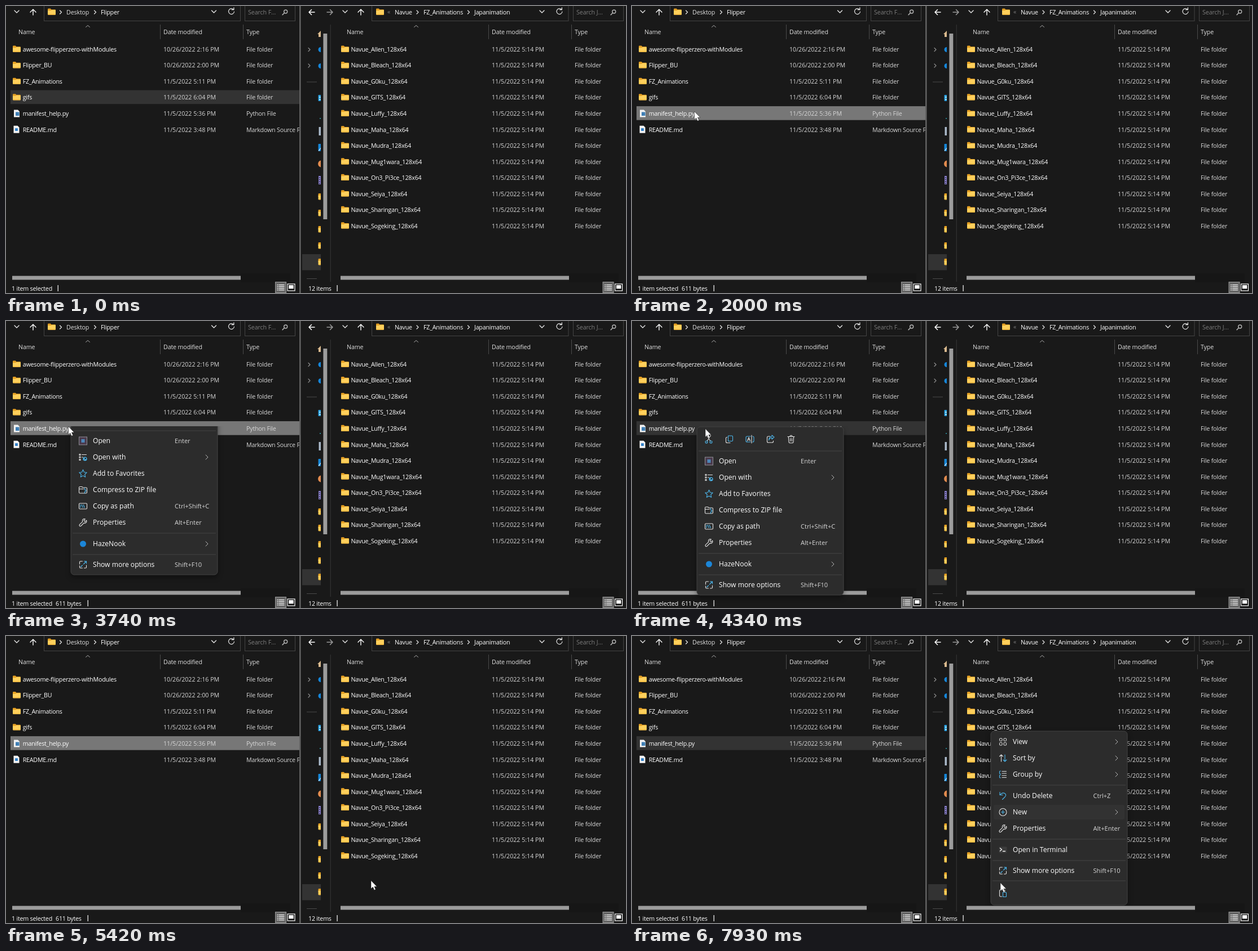
These frames come from a looping animation (1099x510 px, 8000 ms). An HTML page:

```html
<!DOCTYPE html>
<html lang="en">
<head>
<meta charset="utf-8">
<title>File explorer</title>
<style>
html, body { margin: 0; width: 100%; height: 100%; overflow: hidden; background: #191919; }
svg { display: block; width: 1099px; height: 510px; }
text { font: 10.7px "Open Sans", "Noto Sans", sans-serif; fill: #fff; white-space: pre; }
.name { letter-spacing: -.22px; }
.cell { fill: #d6d6d6; letter-spacing: -.02px; }
.kind { fill: #d6d6d6; letter-spacing: -.2px; }
.head { fill: #dedede; letter-spacing: -.15px; }
.dim { fill: #7d7d7d; letter-spacing: -.1px; }
.item { font-size: 12.1px; }
.keys { font-size: 11.1px; fill: #d6d6d6; }
.line { fill: none; stroke-linecap: round; stroke-linejoin: round; }
.pop { filter: drop-shadow(0 4px 5px rgba(0, 0, 0, .4)); }
</style>
</head>
<body>
<svg id="stage" viewBox="0 0 1099 510"></svg>
<script>
const LOOP = 8000, ROW0 = 77, ROW = 28.52;
const USER = 'Navue';
const WHITE = '#e6e6e6', BLUE = '#4cb8ee';
const stage = document.getElementById('stage');

const rect = (x, y, w, h, fill, extra = '') =>
  `<rect x="${x}" y="${y}" width="${w}" height="${h}" fill="${fill}" ${extra}/>`;
const path = (d, color = WHITE, width = 1.1) =>
  `<path class="line" d="${d}" stroke="${color}" stroke-width="${width}"/>`;
const dot = (x, y, r, fill) => `<circle cx="${x}" cy="${y}" r="${r}" fill="${fill}"/>`;
const text = (x, y, s, cls) => `<text class="${cls}" x="${x}" y="${y + 3.9}">${s}</text>`;
const at = (x, y, body) => `<g transform="translate(${x} ${y})">${body}</g>`;
const rowY = i => ROW0 + i * ROW;

const folder = (x, y) => at(x, y,
  '<path d="M0 1.2Q0 0 1.2 0H4.8L6.4 1.7H12.8Q14 1.7 14 2.9V6H0Z" fill="#e5a023"/>' +
  '<path d="M0 3.6H5.4L7 2.5H13Q14 2.5 14 3.6V10.2Q14 11.3 12.9 11.3H1.1Q0 11.3 0 10.2Z" fill="#ffd05c"/>' +
  rect(.4, 9.8, 13.2, 1.4, '#f3b83c', 'rx=".6"'));
const page = (x, y, mark) => at(x, y,
  '<path d="M0 0H7L10 3V13H0Z" fill="#f2f2f2"/>' + mark);

const right = (x, y, c = WHITE) => path(`M${x - 1.5} ${y - 3}l3 3l-3 3`, c, 1.3);
const down = (x, y, r = 4) => path(`M${x - r} ${y - r / 2}l${r} ${r}l${r} ${-r}`, WHITE, 1.4);
const upArrow = (x, y) => path(`M${x} ${y + 5}v-10m-5 5l5 -5l5 5`, '#fff', 1.4);
const sideArrow = (x, y, dir, c) =>
  path(`M${x - 5 * dir} ${y}h${10 * dir}m${-4.5 * dir} -4.5l${4.5 * dir} 4.5l${-4.5 * dir} 4.5`, c, 1.5);
const refresh = (x, y) => path(`M${x + 4} ${y - 3}a5 5 0 1 0 1 3.5m-.6 -7.2v3.8h-3.8`, WHITE, 1.2);
const lens = (x, y) =>
  `<circle cx="${x + 1.2}" cy="${y - 1}" r="3" fill="none" stroke="#b5b5b5" stroke-width="1.4"/>` +
  path(`M${x - 1} ${y + 1.2}l-3.4 3.4`, '#b5b5b5', 1.5);
const box = (x, w) => rect(x, -4, w, 30.5, 'none', 'stroke="#444"');

// Address bar, column headings, scroll bar and view buttons shared by both panes
function frame(bar, barW, find, hint, cols, caret, scroll, views) {
  const [name, date, type] = cols;
  const sep = x => rect(x, 33, 1, 26, '#4a4a4a');
  return box(bar, barW) + box(find, 89) + text(find + 5.5, 11, hint, 'dim') + lens(find + 71, 11) +
    down(bar + barW - 47, 10) + refresh(bar + barW - 16, 9.5) +
    text(name, 46.5, 'Name', 'head') + text(date, 46.5, 'Date modified', 'head') + text(type, 46.5, 'Type', 'head') +
    sep(date - 6) + sep(type - 6) + path(`M${caret - 3.5} 37.5l3.5 -3l3.5 3`, '#aaa', 1) +
    rect(scroll + 405, 475, 88, 16, '#161616') + rect(scroll, 479.6, 405, 6.9, '#9c9c9c') +
    rect(views, 490.5, 19, 19, '#666', 'stroke="#999"') +
    [495.5, 498.5, 501.5, 504.5].map(y => rect(views + 3, y - .5, 2, 1.2, '#fff') +
      rect(views + 6, y - .5, 10, 1.2, '#fff')).join('') +
    rect(views + 21.5, 494, 13, 12, '#111', 'stroke="#fff" stroke-width="1.2"') +
    rect(views + 23.8, 496, 8.4, 6.4, '#fff');
}

const files = [
  ['awesome-flipperzero-withModules', '10/26/2022 2:16 PM', 'File folder'],
  ['Flipper_BU', '10/26/2022 2:00 PM', 'File folder'],
  ['FZ_Animations', '11/5/2022 5:11 PM', 'File folder'],
  ['gifs', '11/5/2022 6:04 PM', 'File folder'],
  ['manifest_help.py', '11/5/2022 5:36 PM', 'Python File'],
  ['README.md', '11/5/2022 3:48 PM', 'Markdown Source File']
];
const packs = 'Allen Bleach G0ku GITS Luffy Maha Mudra Mug1wara On3_Pi3ce Seiya Sharingan Sogeking'.split(' ');

function listRow(i, x, xs, cells, icon) {
  const y = rowY(i);
  return (icon || folder(x, y - 6.4)) + text(xs[0], y, cells[0], 'name') +
    text(xs[1], y, cells[1], 'cell') + text(xs[2], y, cells[2], 'kind');
}

function leftPane() {
  const icons = {
    4: page(14, 184.5, rect(3, 4, 6.5, 6.5, '#3f7fb5')),
    5: page(13.5, 212.7, rect(2.6, 4.5, 4.8, 4.8, '#2f7fc8'))
  };
  return down(19, 10) + upArrow(48, 11) + folder(74, 4.5) + right(97, 11) +
    text(107, 11, 'Desktop', 'head') + right(158, 11) + text(168, 11, 'Flipper', 'name') +
    frame(67.5, 348, 423.5, 'Search F…', [22, 279, 426], 145, 11, 477.5) +
    files.map((f, i) => listRow(i, 12, [29.7, 279, 426], f, icons[i])).join('') +
    text(10, 502, '1 item selected', 'name') +
    '<g id="bytes">' + text(88, 502, '611 bytes', 'name') + '</g>' + rect(0, 496, 1.2, 11, '#fff', 'id="bar"');
}

function sidebar() {
  const bits = [
    '<path d="M552 50L558 44V55H554V50Z" fill="#d9b98e"/>',
    dot(558, 77.5, 4.5, '#1585d8'), dot(558, 106.5, 4.5, '#1585d8'),
    rect(533, 134.5, 18, 1, '#4a4a4a'), rect(553.5, 158, 6, 11, '#2b9fe0', 'rx="1"'),
    rect(555.5, 161, 2, 2, '#dff'), rect(555.5, 165, 2, 2, '#dff'),
    rect(556, 199, 3, 1.5, '#2f9fb0'), rect(554.5, 215, 5, 15, '#a9b7c8'),
    rect(553.5, 245, 6, 13, '#1685d6', 'rx="1"'), path('M554.5 257l4 -5', '#bfe4ff', 1.4),
    dot(559, 280.5, 6, '#e08a4e'),
    rect(554, 302, 5, 15, '#8a7fd0'),
    [304, 307.5, 311, 314.5].map(y => rect(555, y, 1.6, 1.6, '#222')).join('')
  ];
  for (let i = 0; i < 5; i++) bits.push(folder(553.5, 333 + i * 29));
  bits.push(rect(533, 484, 18, 1, '#4a4a4a'));
  return rect(525, 441, 33, 28.5, '#333') + `<g clip-path="url(#side)">${bits.join('')}</g>` +
    right(537.5, 77.5, '#8c8c8c') + right(537.5, 106, '#8c8c8c') +
    rect(562.4, 49, 6.9, 330, '#9c9c9c') + rect(574.5, 33, 1.5, 457, '#2d2d2d');
}

function rightPane() {
  return sideArrow(542, 11, -1, '#fff') + sideArrow(574, 11, 1, '#9a9a9a') + down(601, 10) + upArrow(629, 11) +
    folder(656, 4.5) + text(676, 10, '«', 'dim') + text(689, 11, USER, 'name') + right(729.5, 11) +
    text(740, 11, 'FZ_Animations', 'name') + right(820, 11) + text(830, 11, 'Japanimation', 'name') +
    frame(648.5, 348.5, 1005.5, 'Search J…', [604, 861, 1008], 727, 593, 1058) + sidebar() +
    packs.map((p, i) => listRow(i, 594, [611.5, 861, 1008],
      [`${USER}_${p}_128x64`, '11/5/2022 5:14 PM', 'File folder'])).join('') +
    text(536, 502, '12 items', 'name') + rect(586.5, 496, 1.2, 11, '#fff');
}

// Menu glyphs, drawn around their own centre
const glyph = {
  cut: path('M-3.5 -6.5L3 3.5M3.5 -6.5L-3 3.5') + path('M-6 5a2 2 0 1 0 4 0a2 2 0 1 0 -4 0M2 5a2 2 0 1 0 4 0a2 2 0 1 0 -4 0', BLUE),
  copy: path('M-2 -6H4.5Q6 -6 6 -4.5V2Q6 3.5 4.5 3.5H-2Z', BLUE) + path('M-4 -3.5Q-6 -3.5 -6 -2V4.5Q-6 6.5 -4 6.5H1.5'),
  rename: path('M1 -5H-5Q-7 -5 -7 -3V3Q-7 5 -5 5H1M5 -5Q7 -5 7 -3V3Q7 5 5 5', BLUE) + path('M-4.5 3L-2 -3L.5 3M-3.6 1h3.2M3 -7V7'),
  share: path('M-1 -5H-4Q-6 -5 -6 -3V4Q-6 6 -4 6H3Q5 6 5 4V3') + path('M-3 2Q-2 -2.5 2.5 -2.5V0L6.5 -3.7L2.5 -7V-5Q-2.5 -5 -3 2', BLUE),
  bin: path('M-6 -4.5H6M-4.7 -4.5L-4 5Q-4 6.7 -2 6.7H2Q4 6.7 4 5L4.7 -4.5M-2 -4.5Q-2 -6.7 0 -6.7Q2 -6.7 2 -4.5M-1.4 -1.5V3.5M1.4 -1.5V3.5'),
  open: rect(-7, -7, 14, 14, '#4a3a4c', 'stroke="#8f8f96"') + rect(-3, -3, 6, 6, '#4d86b8'),
  openWith: [-4.5, 0, 4.5].map(y => path(`M-6.5 ${y - 1}h2v2h-2z`)).join('') + path('M-2 -4.5H6M-2 0H0') + dot(3.5, 3, 3.6, BLUE) + path('M2 4.5l3 -3m-2.2 0h2.2v2.2', '#222', 1),
  star: path('M0 -6.8L2 -2.3L6.8 -1.8L3.2 1.5L4.2 6.3L0 3.9L-4.2 6.3L-3.2 1.5L-6.8 -1.8L-2 -2.3Z', BLUE),
  zip: path('M-7 -4Q-7 -5.5 -5.5 -5.5H-2L0 -4H5.5Q7 -4 7 -2.5V4.5Q7 6 5.5 6H-5.5Q-7 6 -7 4.5ZM-7 -1.5H1') + path('M3 -3.5V0H5V3H3V6', BLUE),
  asPath: path('M-5.5 -5H5.5Q7 -5 7 -3.5V3.5Q7 5 5.5 5H-5.5Q-7 5 -7 3.5V-3.5Q-7 -5 -5.5 -5Z') + path('M-4.5 -2.5V2.5M-2.5 -2.5L0 2.5M.5 -2.5L3 2.5', BLUE),
  wrench: path('M6.2 -3.8L3.6 -1.4L1.4 -3.6L3.9 -6.1Q.3 -7.5 -1 -4Q-1.3 -2.6 -.8 -1.4L-6 3.6Q-7.2 5.2 -6 6.3Q-4.6 7.3 -3.4 6L1.6 .9Q4.6 1.7 6.1 -.6Q6.8 -2 6.2 -3.8Z'),
  cloud: dot(0, 0, 5.5, '#1c86d8'),
  more: path('M-1 -6H-4.5Q-6 -6 -6 -4.5V-1M-6 2V4.5Q-6 6 -4.5 6H-1M2 6H4.5Q6 6 6 4.5V1') + path('M1 -1L6 -6M2 -6H6V-2M-4 4L-1 1', BLUE),
  view: [[-6, -6], [1.5, -6], [-6, 1.5], [1.5, 1.5]].map(([x, y]) => rect(x, y, 4.6, 4.6, 'none', `stroke="${WHITE}" rx="1"`)).join(''),
  sort: path('M-3 6V-6M-6 -3L-3 -6L0 -3') + path('M3.5 -6V6M.5 3L3.5 6L6.5 3', BLUE),
  group: path('M-4 -6H-5Q-6 -6 -6 -5V-2Q-6 -1 -5 -1H-4M-4 1H-5Q-6 1 -6 2V5Q-6 6 -5 6H-4', BLUE) + path('M-1.5 -5.5H6M-1.5 -2H6M-1.5 2H6M-1.5 5.5H6'),
  undo: path('M-5.5 -6.5V-1.5H-.5M-5 -2Q-1 -6.5 3 -4.5Q7 -2 3.5 2L-1 6.5', BLUE),
  add: path('M-6.5 0a6.5 6.5 0 1 0 13 0a6.5 6.5 0 1 0 -13 0') + path('M-3 0H3M0 -3V3', BLUE),
  term: rect(-7, -5.5, 14, 11, '#3c3c3c', 'rx="1"') + path('M-5 -3L-2 -.5L-5 2M0 2.5H4', '#fff', 1.3),
  paste: path('M-2 6H-4.5Q-6 6 -6 4.5V-4.5Q-6 -6 -4.5 -6H2Q3.5 -6 3.5 -4.5V-3') + path('M0 -1.5H5Q6 -1.5 6 -.5V5.5Q6 6.5 5 6.5H0Z', BLUE)
};

// An item is [y, glyph, label, shortcut]; '>' marks a submenu
const menuA = {
  id: 'a', x: 115, y: 188, w: 260, h: 299, icon: 136.5, label: 154, keys: 299, seps: [231, 413, 451],
  tools: [[136, 210, 'cut'], [172.5, 210, 'copy'], [209, 210, 'rename'], [245.5, 210, 'share'], [282, 210, 'bin']],
  items: [[249, 'open', 'Open', 'Enter'], [278, 'openWith', 'Open with', '>'], [307, 'star', 'Add to Favorites'],
    [336, 'zip', 'Compress to ZIP file'], [365, 'asPath', 'Copy as path', 'Ctrl+Shift+C'],
    [394, 'wrench', 'Properties', 'Alt+Enter'], [432, 'cloud', 'HazeNook', '>'], [469, 'more', 'Show more options', 'Shift+F10']]
};
const menuB = {
  id: 'b', x: 636, y: 169, w: 242, h: 309, icon: 657.5, label: 675, keys: 817.5, seps: [265, 361, 399, 435],
  tools: [[657.5, 457, 'paste']],
  items: [[188, 'view', 'View', '>'], [217, 'sort', 'Sort by', '>'], [246, 'group', 'Group by', '>'],
    [284, 'undo', 'Undo Delete', 'Ctrl+Z'], [313, 'add', 'New', '>'], [342, 'wrench', 'Properties', 'Alt+Enter'],
    [380, 'term', 'Open in Terminal'], [417, 'more', 'Show more options', 'Shift+F10']]
};

function menu(m) {
  const item = ([y, g, label, keys]) => at(m.icon, y, glyph[g]) + text(m.label, y + .4, label, 'item') +
    (keys === '>' ? path(`M${m.x + m.w - 21} ${y - 4}l4 4l-4 4`, '#b8b8b8', 1) : keys ? text(m.keys, y, keys, 'keys') : '');
  return `<g clip-path="url(#clip-${m.id})"><g id="menu-${m.id}" class="pop">` +
    rect(m.x, m.y, m.w, m.h, '#2c2c2c', 'rx="6" stroke="#434343"') +
    rect(m.x + 5, 0, m.w - 10, 26, '#363636', `rx="3" id="hot-${m.id}"`) +
    m.seps.map(y => rect(m.x + 3, y - .5, m.w - 6, 1, '#444')).join('') +
    m.tools.map(([x, y, g]) => at(x, y, glyph[g])).join('') + m.items.map(item).join('') + '</g></g>';
}
const clip = (id, x, y, w, h) => `<clipPath id="${id}">${rect(x, y, w, h, '#000')}</clipPath>`;
const mark = id => rect(0, 0, 0, 24.6, '#333', `id="${id}"`);

stage.innerHTML = '<defs>' + clip('side', 524, 30, 34, 480) + clip('clip-a', 100, 187, 290, 330) +
  clip('clip-b', 620, 150, 275, 329) + '</defs>' +
  rect(0, 0, 1099, 510, '#191919') + mark('sel') + mark('hover') + leftPane() +
  rect(520, 0, 579, 510, '#191919') + rect(520.2, 0, 2.2, 510, '#6c6c6c') + mark('hover2') + rightPane() +
  rect(590.5, 64, 515, 24, 'none', 'stroke="#6e6e6e" id="focus"') + menu(menuA) + menu(menuB) +
  '<path id="arrow" d="M0 0V14.6L3.3 11.6L5.7 17L8.2 15.9L5.9 10.7H10.4Z" fill="#fff" stroke="#111" stroke-width=".5"/>' +
  '<circle id="press" r="11" fill="#f00" fill-opacity=".5"/>';

const el = {};
stage.querySelectorAll('[id]').forEach(n => el[n.id] = n);
const set = (id, attrs) => { for (const k in attrs) el[id].setAttribute(k, attrs[k]); };
const show = (id, on) => set(id, { visibility: on ? 'visible' : 'hidden' });

// Bursts of screen updates: start, end, number of steps
const bursts = [[380, 590, 4], [850, 980, 3], [1320, 1600, 5], [2000, 2000, 1], [2790, 2870, 2], [3390, 3460, 2],
  [3670, 3870, 4], [4270, 5030, 12], [5100, 5840, 11], [5910, 6100, 4], [6630, 6910, 5], [7250, 7930, 11]];
const trail = [[380, 1086, 398], [590, 800, 338], [850, 350, 237], [980, 204, 187], [1320, 186, 186],
  [1600, 110.5, 187.3], [3870, 110.5, 187.3], [4270, 117, 188], [4339, 130, 191.5], [4700, 215, 300],
  [5030, 440, 438], [5100, 500, 440], [5396, 647, 434.5], [5600, 671, 440], [5840, 631.5, 434.5],
  [6910, 631.5, 434.5], [7250, 640, 428], [7590, 826, 283], [7930, 653, 438.5]];
const presses = [[2790, 2870], [3390, 3460], [5910, 6030], [6630, 6699]];

function snap(t) {
  let s = 0;
  for (const [a, b, n] of bursts) {
    if (t < a) break;
    const step = n > 1 ? (b - a) / (n - 1) : 1;
    s = a + Math.min(n - 1, Math.floor((t - a) / step + 1e-6)) * step;
  }
  return s;
}
function pointer(s) {
  let i = 0;
  while (i < trail.length - 2 && s >= trail[i + 1][0]) i++;
  const [a, x, y] = trail[i], [b, x2, y2] = trail[i + 1];
  const u = Math.max(0, Math.min(1, (s - a) / (b - a)));
  return [x + (x2 - x) * u, y + (y2 - y) * u];
}
const ease = u => 1 - (1 - Math.max(0, Math.min(1, u))) ** 3;
const place = (id, i, x, w, fill) => set(id, { x, y: rowY(i) - 13, width: w, fill });

function update(t) {
  const s = snap(t), [x, y] = pointer(s);
  const openA = s >= 3670 && s < 5100, openB = s >= 6690;

  const picked = s >= 2000;
  const active = picked && s < 4270 || s >= 5100 && s < 5910;
  place('sel', picked ? 4 : 3, 8, 512, active ? '#777' : '#333');
  show('bytes', picked);
  set('bar', { x: picked ? 144.6 : 91.6 });

  const row = Math.round((y - ROW0) / ROW);
  const onRow = s >= 380 && !openA && !openB && row >= 0 && Math.abs(y - rowY(row)) < 12.3;
  const left = onRow && x < 520 && row < files.length && !(picked && row === 4);
  const inRight = onRow && x > 590 && row < packs.length;
  show('hover', left);
  show('hover2', inRight);
  if (left) place('hover', row, 8, 512, '#4d4d4d');
  if (inRight) place('hover2', row, 590, 509, '#4d4d4d');
  show('focus', s >= 5910 && s < 6690);

  show('menu-a', openA);
  set('menu-a', { transform: `translate(0 ${-menuA.h * (1 - ease((s - 3600) / 270))})` });
  const hot = openA && x > menuA.x && x < menuA.x + menuA.w && menuA.items.find(m => Math.abs(m[0] - y) < 14);
  show('hot-a', !!hot);
  if (hot) set('hot-a', { y: hot[0] - 13 });

  show('menu-b', openB);
  set('menu-b', { transform: `translate(0 ${menuB.h * (1 - ease((s - 6630) / 280))})` });
  show('hot-b', s >= 7390);
  set('hot-b', { y: 300, fill: '#323232' });

  show('arrow', s >= 380);
  set('arrow', { transform: `translate(${x} ${y})` });
  show('press', presses.some(([a, b]) => s >= a && s < b));
  set('press', { cx: x, cy: y });
}

const start = performance.now();
function tick() {
  update((performance.now() - start) % LOOP);
  requestAnimationFrame(tick);
}
tick();
</script>
</body>
</html>
```
